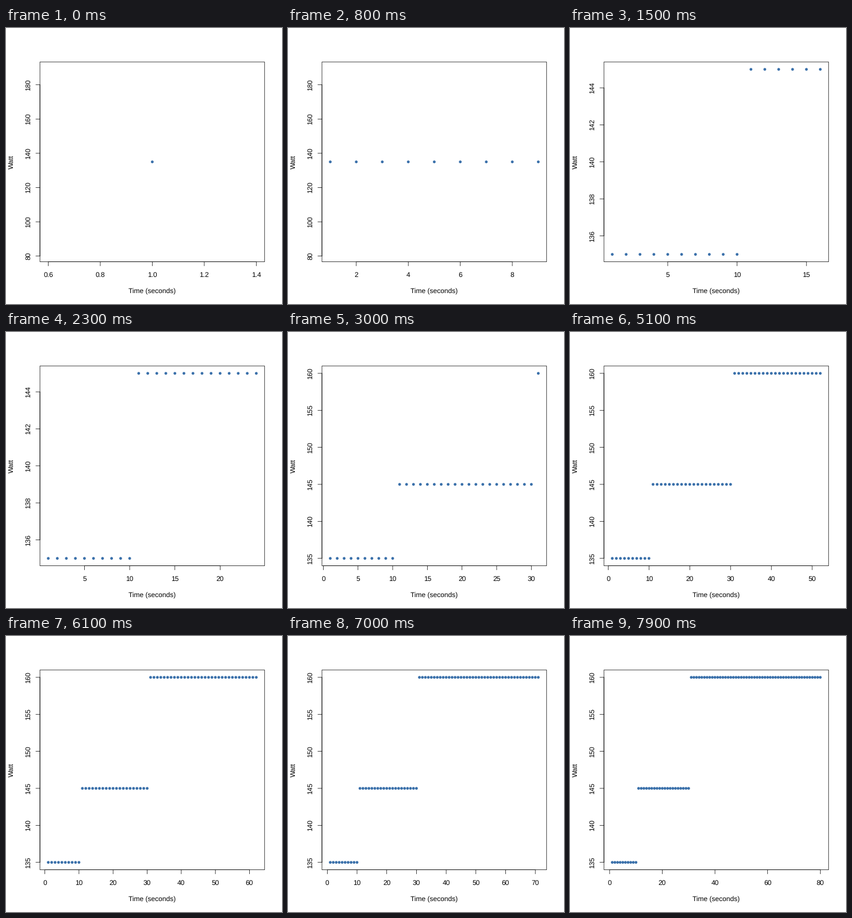
Recreate the animation shown at these times as a matplotlib script. Size 480x480 px, loop 8 s.

```python
import math

import matplotlib.pyplot as plt
from matplotlib.animation import FuncAnimation
from matplotlib.patches import Circle, Rectangle

SIZE, DPI = 480, 72
LEFT, RIGHT, TOP, BOTTOM = 59.04, 449.76, 59.04, 406.56
TICK = 7.2
RADIUS = 2.4
BLUE = "#3a70aa"
COUNT = 80

plt.rcParams["font.family"] = "Liberation Sans"
plt.rcParams["font.size"] = 12
plt.rcParams["text.hinting"] = "none"

fig = plt.figure(figsize=(SIZE / DPI, SIZE / DPI), dpi=DPI, facecolor="white")
ax = fig.add_axes([0, 0, 1, 1])
ax.set_xlim(0, SIZE)
ax.set_ylim(SIZE, 0)
ax.axis("off")


def watt(t):
    return 135 if t <= 10 else 145 if t <= 30 else 160


def limits(lo, hi):
    """Data range with 4 % padding; a single value gets 40 % either side."""
    if lo == hi:
        lo, hi = lo * 0.6, hi * 1.4
    pad = 0.04 * (hi - lo)
    return lo - pad, hi + pad


def pretty(lo, hi):
    """Round tick values inside the range, about five intervals."""
    cell = (hi - lo) / 5
    base = 10 ** math.floor(math.log10(cell))
    unit = base
    for factor, bias in ((2, 0.8), (5, 1.7), (10, 0.8)):
        if factor * base - cell >= bias * (cell - unit):
            break
        unit = factor * base
    first = math.ceil(lo / unit - 1e-7)
    last = math.floor(hi / unit + 1e-7)
    digits = 1 if unit < 1 else 0
    return [(k * unit, f"{k * unit:.{digits}f}") for k in range(first, last + 1)]


def scale(lim, start, end):
    lo, hi = lim
    return lambda v: start + (v - lo) / (hi - lo) * (end - start)


def line(xs, ys):
    return ax.plot(xs, ys, color="black", lw=0.75, snap=False,
                   solid_capstyle="round", zorder=2)[0]


def label(x, y, text, angle=0):
    return ax.text(x, y, text, ha="center", va="baseline", rotation=angle,
                   rotation_mode="anchor", color="black")


ax.add_patch(Rectangle((LEFT, TOP), RIGHT - LEFT, BOTTOM - TOP, fill=False,
                       ec="black", lw=0.75, snap=False, zorder=2))
label((LEFT + RIGHT) / 2, 461.5, "Time (seconds)")
label(13, (TOP + BOTTOM) / 2, "Watt", 90)

shown = []


def draw(i):
    while shown:
        shown.pop().remove()

    n = i + 1
    xlim = limits(1, n)
    ylim = limits(135, watt(n))
    px = scale(xlim, LEFT, RIGHT)
    py = scale(ylim, BOTTOM, TOP)

    for t in range(1, n + 1):
        dot = Circle((px(t), py(watt(t))), RADIUS, fc=BLUE, lw=0, zorder=1)
        shown.append(ax.add_patch(dot))

    xticks = pretty(*xlim)
    shown.append(line([px(xticks[0][0]), px(xticks[-1][0])], [BOTTOM, BOTTOM]))
    for v, text in xticks:
        x = px(v)
        shown.append(line([x, x], [BOTTOM, BOTTOM + TICK]))
        shown.append(label(x, 433, text))

    yticks = pretty(*ylim)
    shown.append(line([LEFT, LEFT], [py(yticks[0][0]), py(yticks[-1][0])]))
    for v, text in yticks:
        y = py(v)
        shown.append(line([LEFT, LEFT - TICK], [y, y]))
        shown.append(label(42, y, text, 90))
    return shown


anim = FuncAnimation(fig, draw, frames=COUNT, interval=100, repeat=True,
                     repeat_delay=0, blit=False)
plt.show()
```
